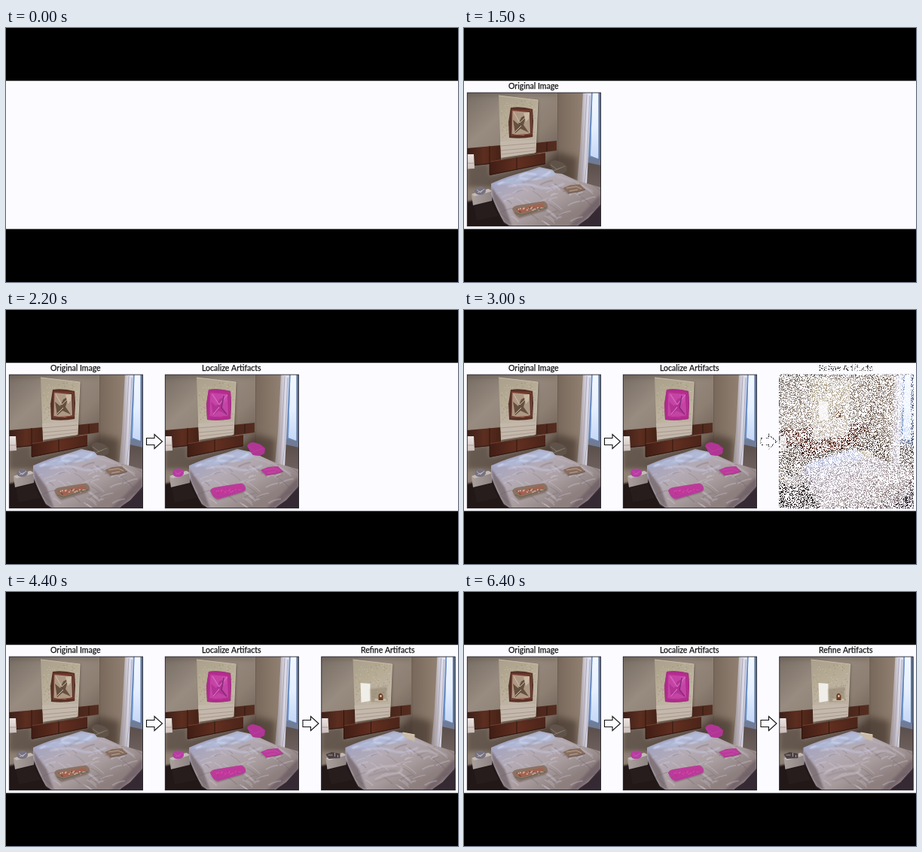
Write an HTML page with a canvas that moves like this. It is 600x338 px and loops after 6500 ms.

```html
<!DOCTYPE html>
<html lang="en">
<head>
<meta charset="utf-8">
<title>Localize and refine</title>
<style>
  html, body { margin: 0; width: 100%; height: 100%; overflow: hidden; background: #000; }
  canvas { display: block; width: 600px; height: 338px; }
</style>
</head>
<body>
<canvas id="stage" width="600" height="338"></canvas>
<script>
const W = 600, H = 338, LOOP = 6500, STEP = 100, DISSOLVE = 500;
const PAPER = '#fcfbff', PINK = '#cb2bae', STRIDE = 207;
const stage = document.getElementById('stage').getContext('2d');

function makeLayer() {
  const c = document.createElement('canvas');
  c.width = W;
  c.height = H;
  return c.getContext('2d', { willReadFrequently: true });
}

function fill(g, d, color, blur = 0.4) {
  g.filter = blur ? `blur(${blur}px)` : 'none';
  g.fillStyle = color;
  g.fill(new Path2D(d));
  g.filter = 'none';
}

function line(g, d, color, width = 1, blur = 0.4) {
  g.filter = blur ? `blur(${blur}px)` : 'none';
  g.strokeStyle = color;
  g.lineWidth = width;
  g.stroke(new Path2D(d));
  g.filter = 'none';
}

function ramp(g, x0, y0, x1, y1, ...colors) {
  const r = g.createLinearGradient(x0, y0, x1, y1);
  colors.forEach((c, i) => r.addColorStop(i / (colors.length - 1), c));
  return r;
}

function random(seed) {
  return () => {
    seed = (seed * 16807) % 2147483647;
    return seed / 2147483647;
  };
}

const ART = 'M62 106 Q76 104 91 108 L92 124 L91 145 Q76 148 60 146 L59 125 Z';
const BASKET = 'M113 181 Q115 176 122 176 L131 179 L137 184 L136 191 L130 194 L121 193 L117 188 Z';
const ORB = 'M14 217 Q15 211 22 211 Q29 211 29 217 Q28 222 21 222 Q15 222 14 217 Z';
const CUSHION = 'M64 241 Q65 237 71 236 L102 231 Q108 230 111 236 Q112 240 107 242 L77 251 Q71 252 68 248 Z';
const SMALL = 'M131 213 L141 209 L154 208 L161 215 L151 218 L138 220 Z';
const BED = 'M36 207 Q58 197 82 191 L100 185 L119 189 L150 203 L181 212 V235 L165 253 L149 264 H62 L53 258 Q44 243 36 221 Z';

function walls(g) {
  fill(g, 'M0 80 H190 V270 H0 Z', ramp(g, 4, 86, 110, 200, '#776d64', '#988b80', '#8d7f72', '#67594f'), 0);
  fill(g, 'M124 80 H190 V270 H124 Z', ramp(g, 124, 0, 160, 0, '#77685b', '#938273'), 0);
  fill(g, 'M0 84 H124 V90 H0 Z', 'rgba(55,48,42,.25)', 3);
  line(g, 'M124.5 86 V190', '#6c5e53', 1);
  fill(g, 'M124 166 L150 172 V206 H104 V184 Z', 'rgba(60,46,38,.6)', 4);
  fill(g, 'M4 182 L34 180 V196 L108 182 V205 L36 212 H4 Z', 'rgba(58,47,41,.5)', 3);
  fill(g, 'M164 174 H184 V216 H158 Z', ramp(g, 0, 178, 0, 214, '#5a4e4b', '#6e615e'), 0.7);
}

function windowSide(g) {
  fill(g, 'M166 80 H184 V180 L165 176 Z', '#6d86ae', 0.3);
  fill(g, 'M170.5 80 H178.5 V174 L168 170 Z', ramp(g, 0, 86, 0, 174, '#f3f8ff', '#e6f0ff', '#c5d7f6'), 0.3);
  line(g, 'M170 82 L167 172', '#6c93cb', 1.5);
  line(g, 'M179.5 82 V178', '#516c98', 1.2);
  fill(g, 'M165 171 L182 176 V183 L164 179 Z', '#707b96');
  fill(g, 'M158 84 H169 L166 150 L163 208 L150 206 L154 161 Z',
    ramp(g, 150, 0, 169, 0, '#938a8b', '#b4abaf', '#d9d8e5', '#dfe5f5'), 0.5);
  line(g, 'M163 88 L159 165 L156 205 M167 90 L163 180 L160 206', '#aca6b6', 1, 0.6);
}

function headboard(g) {
  fill(g, 'M4 160 L49 156 V177 L34 181 L4 184 Z', ramp(g, 4, 0, 49, 0, '#3b2019', '#5c2e20', '#472217'));
  fill(g, 'M94 153 L123 150 V163 L94 167 Z', ramp(g, 94, 0, 123, 0, '#4b261b', '#542d20'));
  fill(g, 'M34 178 L108 166 V181 L34 196 Z', ramp(g, 34, 0, 108, 0, '#401d15', '#622f20', '#4b2419'));
  line(g, 'M34 178 L108 166', '#7b4735', 0.8);
  line(g, 'M34 195.5 L108 180.5 M4 183.5 L34 180.5', '#2b1712', 1);
  line(g, 'M34 157 V195 M70 172 V188 M110 152 V164', '#2c160f', 1);
}

function hanging(g) {
  fill(g, 'M49 92 L99 97 L97 169 L50 176 Z', 'rgba(50,40,33,.4)', 1.5);
  fill(g, 'M46 90 L98 96 L95 166 L49 173 Z',
    ramp(g, 46, 90, 90, 172, '#a99f8b', '#b6ab94', '#c0b5a5', '#b5a899'));
  fill(g, 'M48 151 L95 149 L94 166 L50 172 Z', '#c4b8ac');
  line(g, 'M49 157 L95 153 M49 163 L95 159 M50 168 L95 163', '#a29283', 0.8);
  line(g, 'M46 90 L98 96 L95 166', '#cfc5b2', 0.9);
  const rnd = random(71);
  for (let i = 0; i < 110; i++) {
    const x = 49 + rnd() * 45, y = 95 + rnd() * 53;
    g.fillStyle = rnd() < 0.5 ? 'rgba(216,207,186,.55)' : 'rgba(120,104,80,.35)';
    g.fillRect(x, y, 1.2, 1.2);
  }
}

function furniture(g) {
  fill(g, 'M0 232 L38 224 L64 270 H0 Z', '#211817', 1);
  fill(g, 'M10 222 L33 214 L38 218 L37 230 L12 236 Z', ramp(g, 10, 0, 37, 0, '#aaa09d', '#8e8482'));
  fill(g, 'M10 221 L32 214 L38 217 L14 224 Z', '#c4bbb9');
  fill(g, 'M13 237 L37 231 L40 239 L46 250 L17 256 Z', '#271d1d');
  fill(g, 'M0 168 H13 L14 187 L0 188 Z', ramp(g, 0, 168, 0, 188, '#eae4e1', '#c9bcb8'));
  line(g, 'M5 180 H13', '#a69b9b', 1);
}

// Soft creases that follow the two directions of the mattress.
function creases(g) {
  const rnd = random(409);
  g.save();
  g.clip(new Path2D(BED));
  for (let i = 0; i < 65; i++) {
    const x = 42 + rnd() * 130, y = 200 + rnd() * 60, size = 5 + rnd() * 14;
    const dy = size * (rnd() < 0.5 ? -0.35 : 0.75);
    const color = rnd() < 0.55 ? 'rgba(216,210,222,.3)' : 'rgba(104,91,99,.24)';
    line(g, `M${x} ${y} q${size / 2} ${dy / 2 - 2} ${size} ${dy}`, color, 1 + rnd() * 1.5, 0.6);
  }
  g.restore();
}

function bed(g) {
  fill(g, 'M149 266 L164 248 L184 232 V270 H145 Z', '#352a33', 0.7);
  fill(g, BED, ramp(g, 70, 190, 115, 265, '#a4a4c0', '#b4abb5', '#a99d9f', '#8d7f7e'));
  fill(g, 'M36 211 L54 236 L64 264 L54 259 L39 228 Z', '#81757a', 1);
  fill(g, 'M158 246 L181 222 V236 L149 264 H139 Z', 'rgba(98,81,94,.55)', 1.5);
  creases(g);
  fill(g, 'M39 208 L67 198 L85 193 L101 187 L117 190 L123 195 L104 201 L92 198 L75 206 L54 208 Z', 'rgba(178,188,219,.85)', 1);
  line(g, 'M45 208 Q66 198 82 201 T115 191 M73 197 L82 193 L96 195', '#d8e0f7', 1.6, 0.8);
  line(g, 'M52 204 L65 202 L73 199 M84 204 L96 198 L108 199', '#8991b0', 1.2, 0.8);
  line(g, 'M58 211 Q81 205 97 211 T133 207', '#c6c6dc', 1.8, 1);
  line(g, 'M123 197 Q147 203 171 218', '#c2b9c4', 1.2, 1);
}

function clutter(g) {
  fill(g, ART, '#573026');
  fill(g, 'M64 110 L87 112 L88 140 L78 143 L63 141 Z', '#ad9885');
  fill(g, 'M65 122 L72 128 L76 119 L83 115 L79 129 L86 139 L75 134 L68 140 Z', '#65503f');
  fill(g, 'M79 113 L87 112 L86 121 L82 125 Z', '#cab9a4', 0.6);
  line(g, 'M66 112 L74 126 L87 114 M68 138 L76 130', '#d1c0a9', 1);
  line(g, 'M64 109 L89 110 L90 141 L63 143 Z', '#874634', 1);
  fill(g, BASKET, '#5f5349');
  line(g, 'M115 182 L123 188 L134 184 M119 190 L129 186', '#85786a', 1);
  fill(g, ORB, '#77727e');
  line(g, 'M17 215 L22 219 L27 214 M18 219 L25 216', '#bcb7c4', 1);
  fill(g, 'M65 244 L73 253 L110 242 L111 238 Z', 'rgba(74,59,65,.5)', 1);
  fill(g, CUSHION, '#8a7263');
  fill(g, 'M69 241 L103 234 L107 237 L75 247 Z', '#a5614f');
  const rnd = random(23);
  for (let i = 0; i < 24; i++) {
    const t = rnd();
    g.fillStyle = i % 3 ? '#cfb2a4' : '#6c504a';
    g.fillRect(70 + t * 34, 240 - t * 5 + rnd() * 6, 2, 1.6);
  }
  line(g, 'M68 246 L76 249 L109 239', '#5f6657', 1);
  fill(g, SMALL, '#876e60');
  line(g, 'M136 213 L149 211 L156 214 M140 217 L151 215', '#bea38e', 1);
  line(g, 'M138 220 L151 218 L161 215', '#5c4b48', 0.8);
}

function highlights(g) {
  g.globalAlpha = 0.76;
  for (const d of [ART, BASKET, ORB, CUSHION, SMALL]) fill(g, d, PINK, 0.3);
  g.globalAlpha = 1;
  line(g, 'M67 112 L76 126 L87 113 M68 139 L76 129', '#de78cc', 1);
  line(g, 'M82 114 L79 130 L86 139', '#842c79', 1.5);
}

function refinedDetails(g) {
  fill(g, 'M56 121 L69 122 V145 L57 147 Z', '#f0eee9');
  fill(g, 'M69 129 L91 126 V145 L70 147 Z', 'rgba(126,109,87,.4)', 1);
  fill(g, 'M75 142 H90 V145 H75 Z', '#c8bba6');
  fill(g, 'M80 137 Q83 132 86 138 V144 H80 Z', '#6a3d28');
  fill(g, 'M82 137 h2 v3 h-2 Z', '#f3d2a0', 0);
  fill(g, 'M112 187 L128 190 V198 L120 196 L112 191 Z', '#c9bba6');
  line(g, 'M112 187 L128 190', '#e8dcc6', 1.2);
  line(g, 'M107 186 L116 184 M115 178 V187', '#4c4038', 1.5);
  fill(g, 'M10 216 L18 213 L29 215 L29 221 L14 222 Z', '#4b4143');
  line(g, 'M13 217 h6 M22 214 v5 M26 217 v3', '#a99e9c', 1);
  line(g, 'M63 242 Q74 232 104 231 Q116 234 107 241 Q88 243 75 250', '#c6bcc2', 1.8, 1);
  line(g, 'M66 245 Q88 237 104 238 M75 252 Q91 245 109 243', '#8a7e86', 1, 0.8);
  line(g, 'M128 214 Q147 208 159 217', '#c5bcc6', 1.8, 1);
}

function panel(index, title) {
  const g = makeLayer();
  g.translate(index * STRIDE + (index === 2 ? 0.5 : 0), 0);
  g.save();
  g.beginPath();
  g.rect(4, 86, 178, 178);
  g.clip();
  [walls, windowSide, headboard, hanging, furniture, bed].forEach(draw => draw(g));
  if (index < 2) clutter(g);
  if (index === 1) highlights(g);
  if (index === 2) refinedDetails(g);
  g.restore();
  g.strokeStyle = '#2a2830';
  g.lineWidth = 0.9;
  g.strokeRect(4.3, 86.1, 177.2, 177.5);
  g.font = '10.5px Lato, Carlito, sans-serif';
  g.textAlign = 'center';
  g.fillStyle = g.strokeStyle = '#111';
  g.lineWidth = 0.25;
  g.fillText(title, 92.3, 81);
  g.strokeText(title, 92.3, 81);
  if (index) {
    const arrow = 'M-20.5 170.5 H-10 V165.5 L.5 175 L-10 184.5 V179.5 H-20.5 Z';
    fill(g, arrow, PAPER, 0);
    line(g, arrow, '#111', 1.1, 0);
  }
  return g;
}

function grain(x, y) {
  let h = Math.imul(x, 374761393) + Math.imul(y, 668265263);
  h = Math.imul(h ^ (h >>> 13), 1274126177);
  return ((h ^ (h >>> 16)) >>> 0) / 4294967296;
}

function dissolve(pixels, amount) {
  const out = new ImageData(new Uint8ClampedArray(pixels.data), W, H);
  for (let i = 0; i < W * H; i++) {
    if (grain(i % W, Math.floor(i / W)) >= amount) out.data[i * 4 + 3] = 0;
  }
  return out;
}

const scratch = makeLayer();
const panels = [['Original Image', 210], ['Localize Artifacts', 1600], ['Refine Artifacts', 2800]]
  .map(([title, start], i) => {
    const layer = panel(i, title);
    return { layer, start, pixels: layer.getImageData(0, 0, W, H) };
  });

function draw(time) {
  stage.fillStyle = '#000';
  stage.fillRect(0, 0, W, H);
  stage.fillStyle = PAPER;
  stage.fillRect(0, 70.3, W, 197.2);
  if (time < 300) return;
  for (const { layer, start, pixels } of panels) {
    const amount = (time - start) / DISSOLVE;
    if (amount <= 0) continue;
    if (amount >= 1) {
      stage.drawImage(layer.canvas, 0, 0);
    } else {
      scratch.putImageData(dissolve(pixels, amount), 0, 0);
      stage.drawImage(scratch.canvas, 0, 0);
    }
  }
}

let shown = -1;
const origin = performance.now();
function tick() {
  const elapsed = Math.max(0, performance.now() - origin) % LOOP;
  const time = Math.floor(elapsed / STEP) * STEP;
  if (time !== shown) draw(shown = time);
  requestAnimationFrame(tick);
}
tick();
</script>
</body>
</html>
```
